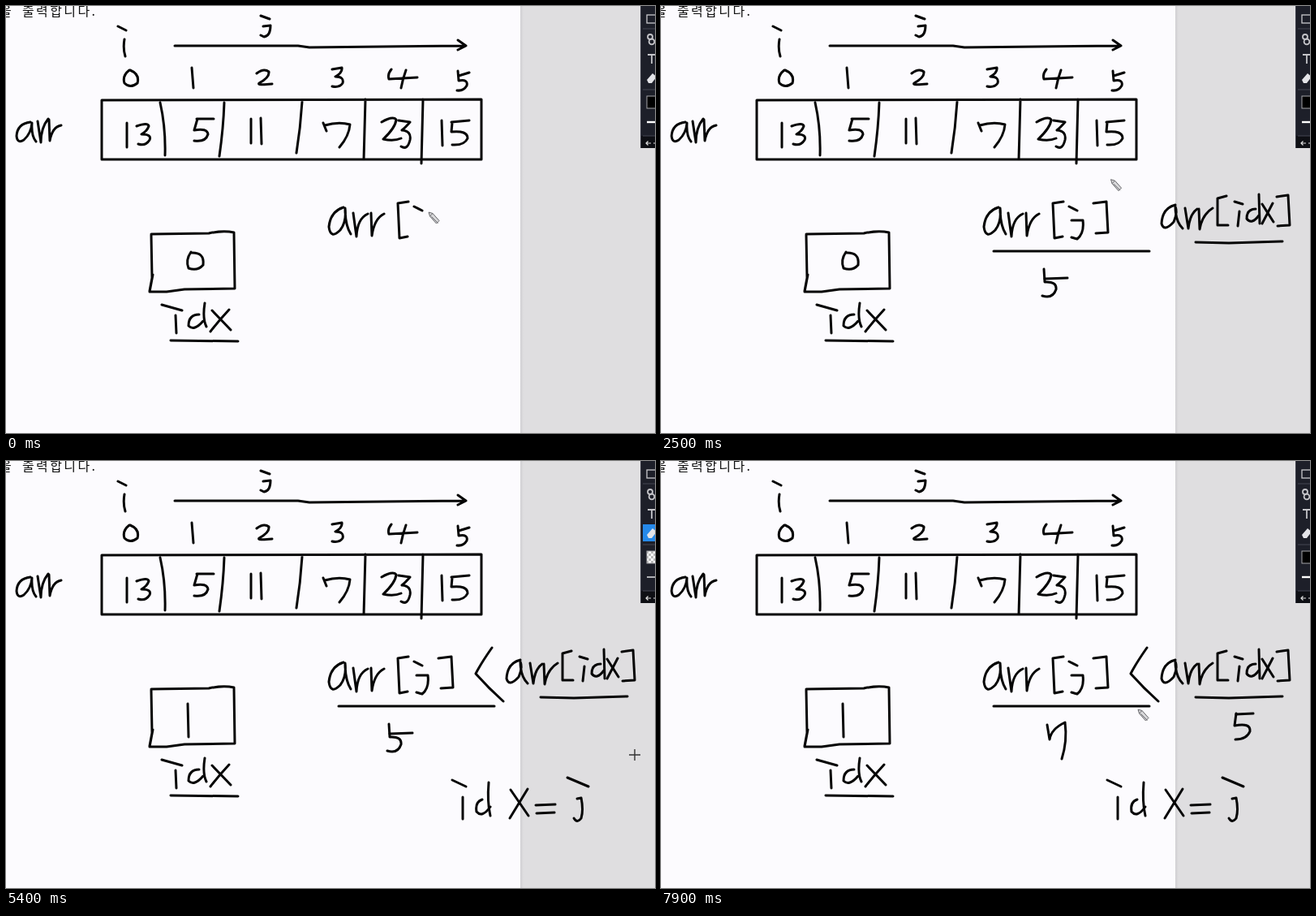
An HTML page that plays this animation: 800x526 px, repeating every 8000 ms.

```html
<!DOCTYPE html>
<html lang="ko">
<head>
<meta charset="utf-8">
<style>
html, body { margin: 0; width: 800px; height: 526px; overflow: hidden; background: #fcfbfe; }
svg { display: block; }
text { font-family: "Noto Sans CJK KR", "Noto Sans CJK", sans-serif; }
.ink { fill: none; stroke: #050505; stroke-width: 3; stroke-linecap: round; stroke-linejoin: round; }
</style>
</head>
<body>
<svg width="800" height="526" viewBox="0 0 800 526">
  <defs>
    <linearGradient id="edge">
      <stop stop-color="#d0cfd2"/><stop offset="1" stop-color="#dfdee0"/>
    </linearGradient>
    <pattern id="checks" width="6" height="6" patternUnits="userSpaceOnUse">
      <path fill="#fff" d="M0 0h6v6h-6z"/><path fill="#bbb" d="M0 0h3v3h-3zM3 3h3v3h-3z"/>
    </pattern>
  </defs>
  <rect width="800" height="526" fill="#fcfbfe"/>
  <rect x="635" width="165" height="526" fill="#dfdee0"/>
  <rect x="634" width="4" height="526" fill="url(#edge)"/>
  <text x="-8" y="12" font-size="16" font-weight="500" letter-spacing="2.400" word-spacing="4" fill="#111">을 출력합니다.</text>

  <g id="toolbar">
    <rect x="782" width="18" height="175" fill="#1d1f29"/>
    <rect x="782" y="160" width="18" height="15" fill="#0e0f14"/>
    <path d="M782.5 0V175" stroke="#3a3c48"/>
    <rect x="790" y="11" width="14" height="10" fill="none" stroke="#c8c8cc" stroke-width="1.3"/>
    <path d="M785 28h15M785 103h15M785 160h15" stroke="#454753"/>
    <g fill="none" stroke="#c4c4c8" stroke-width="1.8">
      <circle cx="794" cy="38" r="3"/><circle cx="796" cy="44" r="3.4"/>
      <path d="M791 60h9M796 60v11"/>
    </g>
    <rect id="pick" x="785" y="78" width="15" height="21" fill="#2589ea"/>
    <path d="M790 91l7-8 5 4-6 8h-4z" fill="#e4e4e8"/>
    <rect id="swatch" x="790" y="111" width="14" height="15" stroke="#a6a6aa"/>
    <path id="line" d="M790 143h10" stroke="#fff" stroke-width="2.4"/>
    <path d="M789 169h6M791.5 166.500l-2.500 2.500 2.500 2.500M798 169h2" fill="none" stroke="#ddd" stroke-width="1.2"/>
  </g>

  <!-- index row -->
  <path class="ink" d="M138 25L148 30M146 41Q144 52 147 62M314 12L325 16M317 25L326 24Q326 37 318 38L314 36
    M208 49L360 49L374 51L566 49M557 42L567 49L557 54
    M152 79Q143 86 146 95Q153 102 162 95Q165 84 153 79M229 76L231 101
    M309 83Q318 76 324 81Q325 88 312 95Q309 98 328 96
    M402 78L414 76Q415 82 406 87Q417 87 415 95Q411 101 402 99
    M475 78Q470 84 472 90L507 88M493 79Q489 90 487 101
    M557 80L558 92Q570 90 568 98Q564 105 556 104M558 86L571 82"/>
  <!-- array -->
  <path class="ink" d="M118 116L586 115L586 189L118 189Z
    M190 119Q197 150 196 184M269 119Q268 150 263 185M365 118Q363 150 358 181M443 115L441 189M514 115L512 194
    M149 144L149 174M161 148Q175 143 176 148Q174 154 167 158Q180 158 177 165Q172 173 163 170
    M236 139L232 153Q248 150 249 158Q246 168 232 166M235 139L256 139
    M302 139L302 169M314 138L315 170M391 144L395 154M393 147Q410 142 424 146Q423 160 411 174
    M463 143Q477 135 481 140Q480 150 465 164Q478 167 487 163M484 141L498 143Q492 150 488 153Q500 154 498 165Q495 178 487 173
    M537 141L538 172M550 144L549 155Q569 153 569 163Q565 172 550 171M549 143L571 141
    M30 143Q14 145 13 160Q14 170 22 165Q31 157 32 144Q31 160 37 167M39 142L43 168Q43 150 52 139M53 140L54 166Q57 149 68 147"/>
  <!-- index box -->
  <path class="ink" d="M179 281L250 280Q268 276 281 279L282 348L220 349L198 352L177 352L181 331M179 282L180 335L177 351
    M192 368L217 375M209 381L210 403M238 380Q225 380 225 394Q232 401 243 388M245 366Q242 385 247 395
    M254 375L277 399M275 374Q262 388 252 401M203 412L286 413"/>

  <g id="notes" class="ink"></g>
  <g id="pen">
    <path d="M0 0l5 1.500 8 9-3.500 3.500-8-9z" fill="#d8d8da" stroke="#66666a" stroke-linejoin="round"/>
    <path d="M3.500 5.500l8 8M5 1.500l-3.500 3.500" stroke="#66666a" fill="none"/>
  </g>
  <path id="cross" d="M-7 0H7M0-7V7" stroke="#333" stroke-width="1.4"/>
</svg>
<script>
const LOOP = 8000, STEP = 100, NEVER = 1e6;
const get = id => document.getElementById(id);
const strokes = [], keys = [];

// Writes each sub-stroke in turn from t0 to t1, and rubs it out from e0 to e1.
function write(t0, t1, d, e0 = NEVER, e1 = NEVER + 1) {
  const parts = d.match(/M[^M]+/g), n = parts.length;
  const slot = (a, b, i) => [a + (b - a) * i / n, a + (b - a) * (i + .8) / n];
  parts.forEach((part, i) => {
    const el = document.createElementNS("http://www.w3.org/2000/svg", "path");
    el.setAttribute("d", part);
    get("notes").append(el);
    const len = el.getTotalLength(), at = f => el.getPointAtLength(f * len);
    const draw = slot(t0, t1, i), wipe = slot(e0, e1, i);
    strokes.push({ el, len, at, draw, wipe });
    for (const span of [draw, wipe]) span.forEach((t, f) => keys.push([t, at(f).x, at(f).y]));
  });
}
const hover = (t, x, y) => keys.push([t, x, y]);

write(-30, -20, "M228 303Q221 313 225 323Q236 327 243 319Q245 303 228 304", 3850, 3990);

// arr[j]
write(-20, -10, "M416 248Q400 253 398 272Q400 288 412 276Q420 266 418 249Q418 270 425 281M428 255L432 284Q433 262 446 256M450 255L451 283Q454 262 466 256M496 241L483 243L485 286L495 284M503 247L513 252");
hover(0, 521, 254);
write(50, 250, "M506 264L520 264Q522 280 513 287L506 285");
write(300, 430, "M533 243L549 241L551 279L536 280");
hover(520, 600, 150);

// arr[idx]
write(620, 920, "M634 245Q618 249 617 268Q620 279 632 266Q637 255 634 247Q634 265 643 274M646 249L650 274Q652 256 661 250M663 250L664 275Q667 257 680 249");
write(920, 1320, "M697 234L686 237L686 270L699 270M707 241L717 244M713 253L711 271M733 250Q722 250 722 262Q728 270 737 258M737 232L738 268M741 244L755 266M754 243L741 268M759 235L773 233L775 270L760 271");
hover(1450, 243, 165);
write(1580, 1740, "M410 302L602 302");
hover(1800, 507, 310);

// compared values
hover(1950, 235, 150);
write(2100, 2300, "M472 324L473 340Q488 339 487 349Q483 361 470 357M473 336L501 335", 6880, 7120);
write(2360, 2480, "M659 291L700 292L766 290");
hover(2580, 170, 75);
write(2680, 2830, "M727 315L724 347M726 333L743 331M738 319L752 319L743 331Q763 328 760 336Q757 345 748 349", 5130, 5360);
write(2850, 2930, "M599 230Q585 250 579 262Q595 280 613 296");

// idx = j
write(2940, 2995, "M550 393L567 401M563 414L563 441");
write(3000, 3140, "M595 396Q593 420 597 437");
write(3140, 3540, "M587 417Q578 420 580 432Q587 440 597 426M622 405L644 437M643 404L621 440M653 424L677 423M654 434L676 433M692 390L718 401M704 416L709 415Q712 430 709 440Q704 447 700 440");
hover(3620, 155, 95);
hover(3740, 792, 88);
hover(4080, 795, 88);
hover(4200, 795, 60);

write(4430, 4560, "M224 299L225 340");
hover(4750, 185, 160);
hover(4950, 795, 88);
hover(5400, 775, 362);
hover(5550, 795, 60);
hover(5750, 190, 150);
write(5980, 6220, "M709 311L707 326Q727 322 726 333Q722 343 708 343M709 312L730 311");
hover(6400, 667, 214);
hover(6650, 795, 88);
hover(7250, 795, 60);
hover(7450, 400, 150);
write(7560, 7780, "M476 325L479 343Q481 330 498 322Q501 345 494 367");
hover(7900, 588, 306);
hover(LOOP, 588, 306);
keys.sort((a, b) => a[0] - b[0]);

const erasing = [[3740, 4200], [4950, 5550], [6650, 7250]];
const within = (t, [a, b]) => t >= a && t < b;
const part = (t, [a, b]) => Math.min(1, Math.max(0, (t - a) / (b - a)));

function cursorAt(t) {
  for (const s of strokes)
    for (const span of [s.draw, s.wipe])
      if (within(t, span)) return s.at(part(t, span));
  const i = keys.findIndex(k => k[0] > t);
  const [ta, xa, ya] = keys[i - 1], [tb, xb, yb] = keys[i];
  const f = part(t, [ta, tb]);
  return { x: xa + (xb - xa) * f, y: ya + (yb - ya) * f };
}

function show(el, on) { el.style.display = on ? "" : "none"; }

function render(now) {
  const t = Math.floor(now % LOOP / STEP) * STEP;
  for (const { el, len, draw, wipe } of strokes) {
    const from = part(t, wipe), to = part(t, draw);
    show(el, to > from);
    const whole = from === 0 && to === 1;
    el.style.strokeDasharray = whole ? "none" : `${(to - from) * len} ${2 * len}`;
    el.style.strokeDashoffset = -from * len;
  }
  const rub = erasing.some(span => within(t, span));
  const { x, y } = cursorAt(t);
  for (const id of ["pen", "cross"]) {
    get(id).setAttribute("transform", `translate(${x} ${y})`);
    show(get(id), (id === "cross") === rub && x < 783);
  }
  show(get("pick"), rub);
  get("swatch").setAttribute("fill", rub ? "url(#checks)" : "#000");
  get("line").setAttribute("stroke-width", rub ? 1.3 : 2.4);
}

const start = performance.now();
(function frame() {
  render(performance.now() - start);
  requestAnimationFrame(frame);
})();
</script>
</body>
</html>
```
